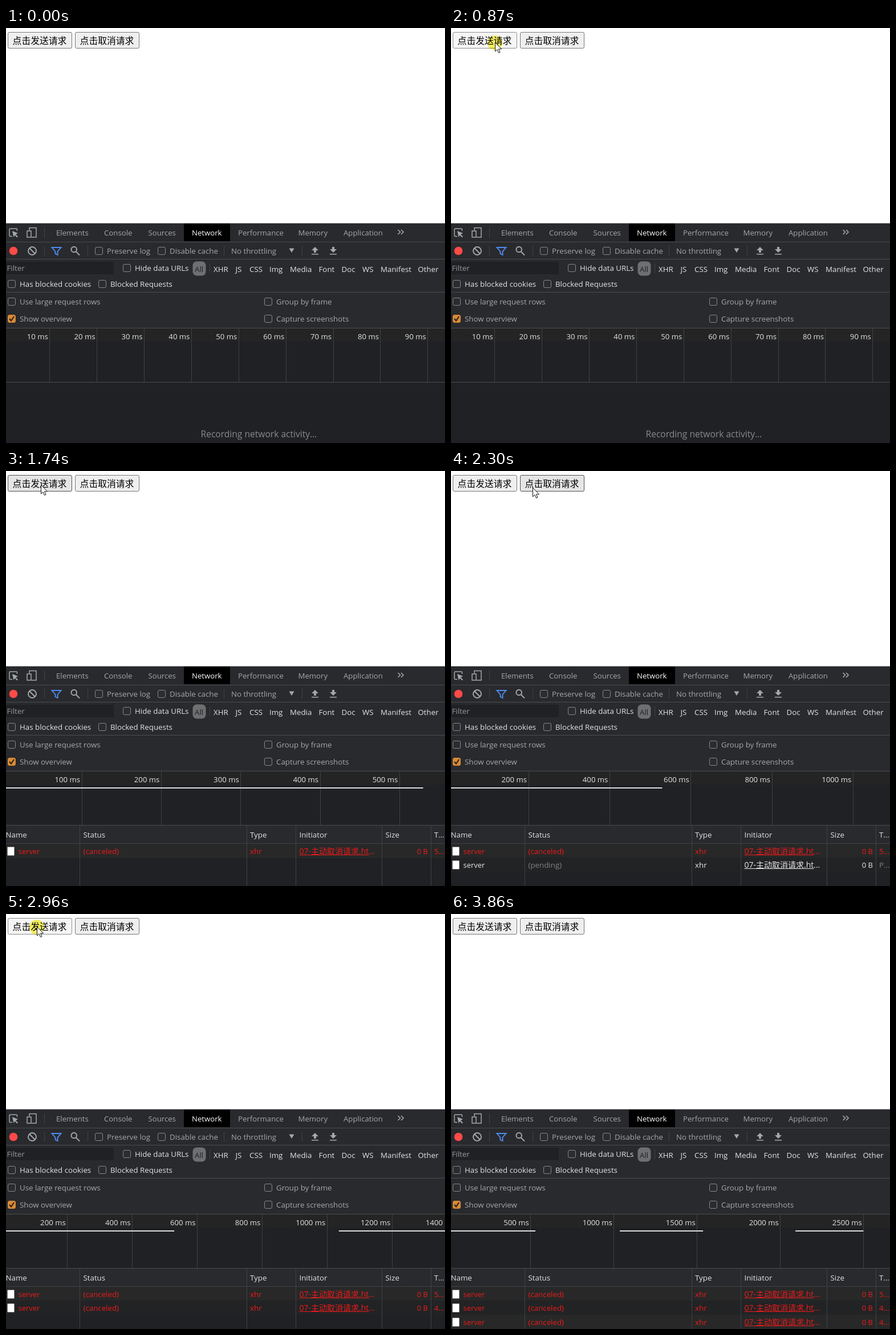
Write an HTML page with a canvas that moves like this. It is 770 by 728 pixels and loops after 4260 ms.

```html
<!DOCTYPE html>
<html lang="zh">
<head>
<meta charset="utf-8">
<title>Cancel request</title>
<style>
html, body { margin: 0; width: 100%; height: 100%; overflow: hidden; background: #fff; }
canvas { display: block; }
</style>
</head>
<body>
<canvas id="stage" width="770" height="728"></canvas>
<script>
const ctx = document.getElementById('stage').getContext('2d');
const LOOP = 4260, W = 770, H = 728;
const FONT = '"Open Sans", "Noto Sans CJK SC", "Noto Sans CJK", sans-serif';
const PANEL = '#292a2d', DARK = '#202124', LINE = '#494c50';
const DIM = '#a4a8ac', LIGHT = '#e2e3e5', RED = '#ec1a1a';

// Requests: when the row shows, when it is canceled, span on the time axis
const requests = [
  { at: 1010, cancel: 1540, from: 0, to: 530, time: '5…' },
  { at: 2010, cancel: 2500, from: 1037, to: 1537, time: '4…' },
  { at: 3090, cancel: 3510, from: 2092, to: 2500, time: '4…' }
];
// Zoom of the time axis: [start, px per ms]
const zooms = [[0, 8.29], [1540, 1.393], [2010, .7115], [2500, .5695], [3090, .353], [3510, .292]];
const AXIS = -6.7;

// Pointer moves: start, end, number of steps, from, to
const moves = [
  [130, 600, 8, 376, 540, 80, 27],
  [670, 870, 3, 80, 27, 77, 25],
  [1010, 1410, 6, 77, 25, 150, 28],
  [1540, 1740, 4, 150, 28, 61, 24],
  [1940, 2300, 6, 61, 24, 143, 29],
  [2500, 2960, 7, 143, 29, 54, 22],
  [3090, 3510, 7, 54, 22, 168, 27],
  [3580, 3790, 4, 175, 79, 225, 658]
];
const presses = [[870, 1010], [1410, 1540], [1940, 2010], [2430, 2500], [2960, 3090], [3440, 3510]];
const GONE = 3860;

function rect(x, y, w, h, color) {
  ctx.fillStyle = color;
  ctx.fillRect(x, y, w, h);
}

function box(x, y, w, h, r, fill, stroke) {
  ctx.beginPath();
  ctx.roundRect(x + .5, y + .5, w - 1, h - 1, r);
  ctx.fillStyle = fill;
  ctx.fill();
  if (stroke) { ctx.strokeStyle = stroke; ctx.lineWidth = 1; ctx.stroke(); }
}

function text(str, x, y, color = LIGHT, size = 13.3, align = 'left') {
  ctx.font = size + 'px ' + FONT;
  ctx.textAlign = align;
  ctx.fillStyle = color;
  ctx.fillText(str, x, y);
}

function path(d, x, y, color, width = 1.6, fill) {
  const p = new Path2D(d);
  ctx.save();
  ctx.translate(x, y);
  if (fill) { ctx.fillStyle = fill; ctx.fill(p); }
  if (color) { ctx.strokeStyle = color; ctx.lineWidth = width; ctx.stroke(p); }
  ctx.restore();
}

function disc(x, y, r, color) {
  ctx.beginPath();
  ctx.arc(x, y, r, 0, 7);
  ctx.fillStyle = color;
  ctx.fill();
}

function check(x, y, label, color, on) {
  box(x - 7, y - 7, 14, 14, 2.5, on ? '#d98a35' : '#2b2c2f', on ? '#d98a35' : '#85878a');
  if (on) path('M-4 0L-1 3.5L4 -4', x, y, '#2a2420', 2.2);
  text(label, x + 14, y + 5, color);
}

function pointerAt(t) {
  if (t < moves[0][0] || t >= GONE) return null;
  const [start, end, steps, x0, y0, x1, y1] = moves.filter(m => m[0] <= t).pop();
  const n = steps - 1;
  const i = Math.min(n, Math.floor((t - start) / (end - start) * n + 1e-6));
  const u = i / n;
  const k = start === 130 ? 1 - (1 - u) ** 2 : u * u * (3 - 2 * u);
  return { x: x0 + (x1 - x0) * k, y: y0 + (y1 - y0) * k };
}

function drawButton(x, w, label, pointer, pressed) {
  const over = pointer && pointer.x >= x && pointer.x < x + w && pointer.y >= 7 && pointer.y < 36;
  const [fill, edge] = !over ? ['#efefef', '#767676'] : pressed ? ['#f5f5f5', '#8d8d8d'] : ['#e5e5e5', '#4f4f4f'];
  box(x, 7, w, 29, 2.5, fill, edge);
  text(label, x + w / 2 - .5, 27.5, '#000', 15.8, 'center');
}

function drawTabs() {
  rect(0, 343, W, 183, PANEL);
  rect(0, 342, W, 1, '#a0a1a3');
  path('M5 6.5H1.5Q0 6.5 0 5V-5.5Q0 -7 1.5 -7H12Q13.5 -7 13.5 -5.5V-3', 6, 359, DIM, 1.5);
  path('M5 -3L15 1L11 3L15 7L13.5 8.5L9.5 4.5L7.5 8Z', 6, 359, null, 0, DIM);
  path('M4 -4V-8.5H16V8H8', 37, 359, DIM, 1.5);
  path('M0 -3H7V8H0Z', 37, 359, DIM, 1.5);
  rect(67, 350, 1, 18, '#404246');
  rect(0, 375, W, 1, LINE);
  rect(312, 343, 81, 31, '#000');
  [['Elements', 88], ['Console', 172], ['Sources', 249.5], ['Network', 326], ['Performance', 407],
   ['Memory', 512.5], ['Application', 592]].forEach(([s, x]) =>
    text(s, x, 364, s === 'Network' ? '#fff' : DIM, 13.2));
  path('M-4.5 -4L-.5 0L-4.5 4M1 -4L5 0L1 4', 692, 358, DIM, 1.6);
}

function drawToolbar() {
  disc(13, 391, 7.3, '#ff4a48');
  path('M7 0A7 7 0 1 1 -7 0A7 7 0 1 1 7 0M-5 -5L5 5', 46, 391, DIM, 1.9);
  path('M-8 -6H8L2 1V7L-2 5V1Z', 88.5, 391, '#4d8df0', 1.9);
  path('M3 -2A4.8 4.8 0 1 1 -6.6 -2A4.8 4.8 0 1 1 3 -2M2 2L8 8', 121, 390.5, DIM, 1.9);
  [67, 143, 382, 519].forEach(x => rect(x, 382, 1, 17, '#404246'));
  check(163, 391, 'Preserve log', DIM);
  check(273, 391, 'Disable cache', DIM);
  text('No throttling', 395, 396, DIM);
  path('M-4.5 -3.5H4.5L0 4Z', 501, 390, null, 0, DIM);
  path('M0 -7L6 -1H2V3H-2V-1H-6ZM-6 5H6V6.5H-6Z', 542, 391, null, 0, DIM);
  path('M0 3L6 -3H2V-7H-2V-3H-6ZM-6 5H6V6.5H-6Z', 574, 391, null, 0, DIM);
  rect(0, 405, W, 1, LINE);
}

function drawFilters() {
  rect(0, 410, 189, 22, DARK);
  text('Filter', 1.5, 426, '#96999d');
  check(212, 421, 'Hide data URLs', LIGHT);
  box(327, 409, 24, 26, 7, '#6e6f71');
  text('All', 331, 428, '#202124', 13.3);
  rect(357, 413, 1, 17, '#404246');
  [['XHR', 364], ['JS', 402.5], ['CSS', 427], ['Img', 462], ['Media', 498], ['Font', 548.5], ['Doc', 588.5],
   ['WS', 625], ['Manifest', 657], ['Other', 722.5]].forEach(([s, x]) => text(s, x, 428));
  check(10, 449, 'Has blocked cookies', LIGHT);
  check(169, 449, 'Blocked Requests', LIGHT);
  rect(0, 463, W, 1, LINE);
  check(10, 480, 'Use large request rows', DIM);
  check(460, 480, 'Group by frame', DIM);
  check(10, 510, 'Show overview', DIM, true);
  check(460, 510, 'Capture screenshots', DIM);
}

function drawOverview(t) {
  const scale = zooms.filter(z => z[0] <= t).pop()[1];
  const step = [10, 20, 50, 100, 200, 500].find(s => s * scale >= 80);
  rect(0, 526, W, 95, DARK);
  rect(0, 527, W, 23, '#242424');
  rect(0, 526, W, 1, LINE);
  for (let ms = step, x; (x = AXIS + ms * scale) < W + 50; ms += step) {
    rect(Math.round(x), 527, 1, 94, '#3f4042');
    text(ms + ' ms', x - 2.5, 546, LIGHT, 13.2, 'right');
  }
  requests.filter(r => t >= r.cancel).forEach(r =>
    rect(AXIS + r.from * scale, 555, (r.to - r.from) * scale, 2, '#dcdcdc'));
}

function drawRow(r, i, t, pointer) {
  const y = 654 + i * 24.4, base = Math.round(y + 18);
  const over = pointer && pointer.y >= y && pointer.y < y + 24.4;
  const canceled = t >= r.cancel;
  const color = canceled ? RED : '#e8e8e8', soft = canceled ? RED : '#808284';
  rect(0, Math.round(y), W, 25, over ? '#263139' : i % 2 ? '#222325' : '#282828');
  box(2, base - 13, 13, 16, 1, '#fff', '#888');
  text('server', 21.5, base, color, 13);
  text(canceled ? '(canceled)' : '(pending)', 135.5, base, soft);
  text('xhr', 428, base, color);
  text('07-主动取消请求.ht…', 514.5, base, color, 14);
  rect(514.5, base + 1, 122, 1, color);
  text('0 B', 740, base, color, 13, 'right');
  text(canceled ? r.time : 'P…', 751, base, soft);
}

function drawTable(t, pointer) {
  rect(0, 621, W, H - 621, DARK);
  rect(0, 621, W, 1, LINE);
  const rows = requests.filter(r => t >= r.at);
  if (!rows.length) {
    text('Recording network activity…', 341.5, 717.5, '#87898c', 15.6);
    return;
  }
  rect(0, 622, W, 31, PANEL);
  rect(0, 653, W, 1, '#3f4144');
  [['Name', -.5], ['Status', 135.5], ['Type', 428], ['Initiator', 514.5], ['Size', 665.5], ['T…', 751]]
    .forEach(([s, x]) => text(s, x, 643));
  rows.forEach((r, i) => drawRow(r, i, t, pointer));
  [129, 422, 508, 659, 745].forEach(x => rect(x, 622, 1, H - 622, '#3f4144'));
}

function drawPointer(p, pressed) {
  if (pressed) {
    ctx.globalCompositeOperation = 'multiply';
    disc(p.x, p.y + 1, 13, '#fbf562');
    ctx.globalCompositeOperation = 'source-over';
  }
  path('M.5 .5V16L4 12.8L6.6 18.5L9 17.4L6.5 11.9H11.5Z', Math.round(p.x), Math.round(p.y), '#111', 1, '#fff');
}

function draw(t) {
  const pointer = pointerAt(t);
  const pressed = presses.some(([a, b]) => t >= a && t < b);
  rect(0, 0, W, H, '#fff');
  drawButton(3, 113, '点击发送请求', pointer, pressed);
  drawButton(121, 113, '点击取消请求', pointer, pressed);
  drawTabs();
  drawToolbar();
  drawFilters();
  drawOverview(t);
  drawTable(t, pointer);
  if (pointer) drawPointer(pointer, pressed);
}

const began = performance.now();
function tick() {
  draw((performance.now() - began) % LOOP);
  requestAnimationFrame(tick);
}
tick();
</script>
</body>
</html>
```
